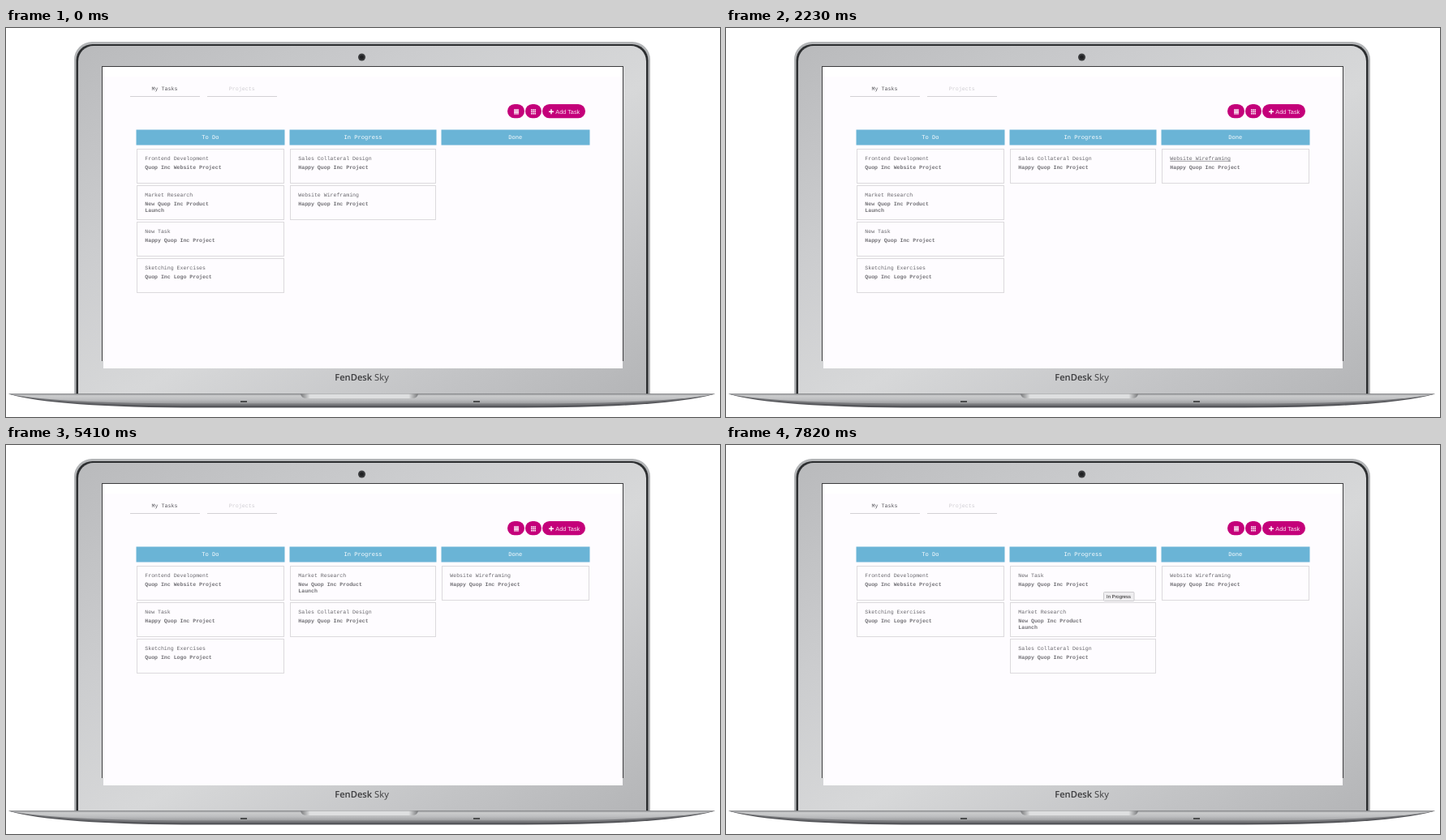
An HTML page for the animation above (7870 ms loop, 880x480 px).

```html
<!DOCTYPE html>
<html lang="en">
<head>
<meta charset="utf-8">
<title>Task board</title>
<style>
  html, body { margin: 0; width: 100%; height: 100%; overflow: hidden; background: #fff; }
  svg { display: block; width: 880px; height: 480px; text-rendering: geometricPrecision; }
  .mono { font-family: "Liberation Mono", "Courier New", monospace; }
  .sans { font-family: "Liberation Sans", Arial, sans-serif; }
  .head text { font-size: 7.1px; fill: #fff; text-anchor: middle; }
  .tab { font-size: 6.65px; text-anchor: middle; }
  .card rect { fill: #fefcff; stroke: #dcdadd; }
  .card text { font-size: 6.55px; fill: #68676c; }
  .card .bold { font-weight: bold; fill: #727176; }
  .card line { stroke: #77767a; stroke-width: .7; visibility: hidden; }
  .card.hover line { visibility: visible; }
  .card.dragged { opacity: .82; }
  #slot { fill: #d8d8da; stroke: #c4c4c6; stroke-dasharray: 2 1; }
</style>
</head>
<body>
<svg viewBox="0 0 880 480">
  <defs>
    <linearGradient id="metal" x1="0" y1="0" x2="1" y2="1">
      <stop offset="0" stop-color="#b9babc"/>
      <stop offset=".3" stop-color="#cbccce"/>
      <stop offset=".55" stop-color="#d7d8d9"/>
      <stop offset=".8" stop-color="#c3c4c6"/>
      <stop offset="1" stop-color="#b4b5b7"/>
    </linearGradient>
    <linearGradient id="base" x1="0" y1="0" x2="0" y2="1">
      <stop offset="0" stop-color="#97989a"/>
      <stop offset=".2" stop-color="#cbcccd"/>
      <stop offset=".6" stop-color="#bcbdbf"/>
      <stop offset="1" stop-color="#9c9d9f"/>
    </linearGradient>
    <linearGradient id="notch" x1="0" y1="0" x2="1" y2="0">
      <stop offset="0" stop-color="#77787a"/>
      <stop offset=".08" stop-color="#dedfe0"/>
      <stop offset=".92" stop-color="#dedfe0"/>
      <stop offset="1" stop-color="#77787a"/>
    </linearGradient>
  </defs>

  <!-- Laptop -->
  <path d="M84 452V39A22 22 0 0 1 106 17H772A22 22 0 0 1 794 39V452Z" fill="#b3b5b7"/>
  <path d="M86.500 452V40A20 20 0 0 1 106.500 20H771.500A20 20 0 0 1 791.500 40V452Z" fill="#2c2e30"/>
  <path d="M89 452V41A19 19 0 0 1 108 22H770A19 19 0 0 1 789 41V452Z" fill="url(#metal)"/>
  <circle cx="438.500" cy="36" r="4.500" fill="#3a3b3d"/>
  <circle cx="438.500" cy="36" r="2.500" fill="#202123"/>
  <path d="M118 47H761V411H118Z" fill="#3c3c3e"/>
  <path d="M119 48H760V420H120V411H119Z" fill="#fefcff"/>
  <path d="M119 48H760V60H119Z" fill="#fff"/>
  <text x="438.500" y="435" text-anchor="middle" font-size="11.200" fill="#3b3b3d"
    font-family="'Open Sans', 'Noto Sans', sans-serif"><tspan font-weight="600">FenDesk</tspan> Sky</text>
  <path d="M3 451.500H874Q815 468.500 638 468.500H240Q60 468.500 3 451.500Z" fill="#55565a"/>
  <path d="M3 451.500H874Q815 466 638 466H240Q60 466 3 451.500Z" fill="#77787b"/>
  <path d="M3 451.500H874Q815 463.500 638 463.500H240Q60 463.500 3 451.500Z" fill="url(#base)"/>
  <path d="M363 451.500H508Q507 457 500 457H371Q364 457 363 451.500Z" fill="url(#notch)"/>
  <path d="M289 461H297M576 461H584" stroke="#2b2c2e" stroke-width="1.500"/>

  <!-- Page header -->
  <g class="mono">
    <text class="tab" x="195.500" y="77" fill="#58575c">My Tasks</text>
    <text class="tab" x="290.800" y="77" fill="#cfcdd1">Projects</text>
  </g>
  <path d="M153 84.500H239M248 84.500H334" stroke="#d3d1d5"/>
  <g fill="#c4007a">
    <rect x="618" y="94" width="21" height="17.300" rx="8.600"/>
    <rect x="640" y="94" width="20" height="17.300" rx="8.600"/>
    <rect x="661" y="94" width="53" height="17.300" rx="8.600"/>
  </g>
  <path d="M626 100.900H632M626 102.600H632M626 104.300H632M626 106H632" stroke="#fff" stroke-width="1.200"/>
  <path d="M647 101H653M647 103.300H653M647 105.600H653" stroke="#fff" stroke-width="1.600" stroke-dasharray="1.600 .6"/>
  <path d="M669 103.300H675M672 100.300V106.300" stroke="#fff" stroke-width="1.500"/>
  <text class="sans" x="677.300" y="105.700" font-size="7.300" fill="#fce6f3">Add Task</text>

  <g class="head mono">
    <path d="M160.500 125.500H343.500V144.500H160.500ZM349.500 125.500H530.500V144.500H349.500ZM536.500 125.500H719.500V144.500H536.500Z" fill="#6ab4d6"/>
    <text x="252" y="137.300">To Do</text>
    <text x="440" y="137.300">In Progress</text>
    <text x="627.700" y="137.300">Done</text>
  </g>

  <rect id="slot" height="42" rx="4.500"/>
  <g id="cards" class="mono"></g>

  <g id="tip" class="sans">
    <rect x="465.500" y="181.500" width="37.500" height="11" rx="1" fill="#efeef0" stroke="#cccbce"/>
    <text x="469" y="189.200" font-size="5.870" fill="#222">In Progress</text>
  </g>
</svg>

<script>
const LOOP = 7870, TOP = 149, PITCH = 45, TIP_ON = 7420;
const COLUMNS = [{ x: 161, w: 181 }, { x: 350, w: 179 }, { x: 537, w: 181 }];

const TASKS = {
  frontend: ["Frontend Development", "Quop Inc Website Project"],
  market: ["Market Research", "New Quop Inc Product", "Launch"],
  fresh: ["New Task", "Happy Quop Inc Project"],
  sketch: ["Sketching Exercises", "Quop Inc Logo Project"],
  sales: ["Sales Collateral Design", "Happy Quop Inc Project"],
  wire: ["Website Wireframing", "Happy Quop Inc Project"]
};
const START = [["frontend", "market", "fresh", "sketch"], ["sales", "wire"], []];

// Each path point is time, x, y; the slot changes column at "cross".
const DRAGS = [
  { id: "wire", from: 1, to: 2, cross: 1190, drop: 1760, path: [
    [860, 350, 194], [960, 372, 189], [1120, 433, 169], [1270, 481, 156],
    [1420, 513, 152], [1590, 532, 152], [1700, 536, 151]] },
  { id: "market", from: 0, to: 1, cross: 3725, drop: 4150, path: [
    [3180, 161, 194], [3300, 176, 194], [3500, 250, 189], [3680, 305, 177],
    [3730, 313, 169], [3850, 334, 160], [4050, 349, 150]] },
  { id: "fresh", from: 0, to: 1, cross: 5850, drop: 6480, path: [
    [5420, 161, 194], [5540, 172, 189], [5720, 231, 168], [5910, 296, 153],
    [6180, 322, 149], [6400, 345, 149]] }
];
const HOVERS = [
  { id: "wire", on: 2140, off: 2420 },
  { id: "sales", on: 4900, off: 5100 }
];

const slot = document.getElementById("slot");
const layer = document.getElementById("cards");
const tip = document.getElementById("tip");
const cards = {};

function add(parent, tag, attrs, text) {
  const node = document.createElementNS("http://www.w3.org/2000/svg", tag);
  for (const key in attrs) node.setAttribute(key, attrs[key]);
  if (text) node.textContent = text;
  return parent.appendChild(node);
}

for (const id in TASKS) {
  const [title, ...lines] = TASKS[id];
  const group = add(layer, "g", { class: "card" });
  const box = add(group, "rect", { x: .5, y: .5, height: 42 });
  add(group, "text", { x: 10.3, y: 14 }, title);
  add(group, "line", { x1: 10.3, x2: 10.3 + title.length * 3.93, y1: 15.3, y2: 15.3 });
  lines.forEach((line, i) =>
    add(group, "text", { x: 10.3, y: 24.6 + i * 8, class: "bold" }, line));
  cards[id] = { group, box };
}

function place(id, x, y, width) {
  cards[id].group.setAttribute("transform", `translate(${x} ${y})`);
  cards[id].box.setAttribute("width", width);
}

function along(path, t) {
  const next = path.findIndex(p => p[0] > t);
  if (next < 0) return path[path.length - 1].slice(1);
  const [t0, x0, y0] = path[next - 1], [t1, x1, y1] = path[next];
  const k = (t - t0) / (t1 - t0);
  return [x0 + (x1 - x0) * k, y0 + (y1 - y0) * k];
}

function draw(t) {
  const board = START.map(column => [...column]);
  let active = null;
  for (const drag of DRAGS) {
    if (t >= drag.path[0][0] && t < drag.drop) active = drag;
    if (t >= drag.cross) {
      board[drag.from] = board[drag.from].filter(id => id !== drag.id);
      board[drag.to].unshift(drag.id);
    }
  }

  slot.style.visibility = active ? "visible" : "hidden";
  board.forEach((column, c) => column.forEach((id, row) => {
    const { x, w } = COLUMNS[c], y = TOP + row * PITCH;
    if (!active || id !== active.id) return place(id, x, y, w);
    const width = COLUMNS[active.from].w;
    slot.setAttribute("x", x + .5);
    slot.setAttribute("y", y + .5);
    slot.setAttribute("width", width);
    place(id, ...along(active.path, t), width - 2);
  }));

  for (const id in cards) {
    const { classList } = cards[id].group;
    classList.toggle("dragged", !!active && active.id === id);
    classList.toggle("hover", HOVERS.some(h => h.id === id && t >= h.on && t < h.off));
  }
  if (active && layer.lastChild !== cards[active.id].group) {
    layer.append(cards[active.id].group);
  }
  tip.style.visibility = t >= TIP_ON ? "visible" : "hidden";
}

function tick() {
  draw(performance.now() % LOOP);
  requestAnimationFrame(tick);
}
tick();
</script>
</body>
</html>
```
